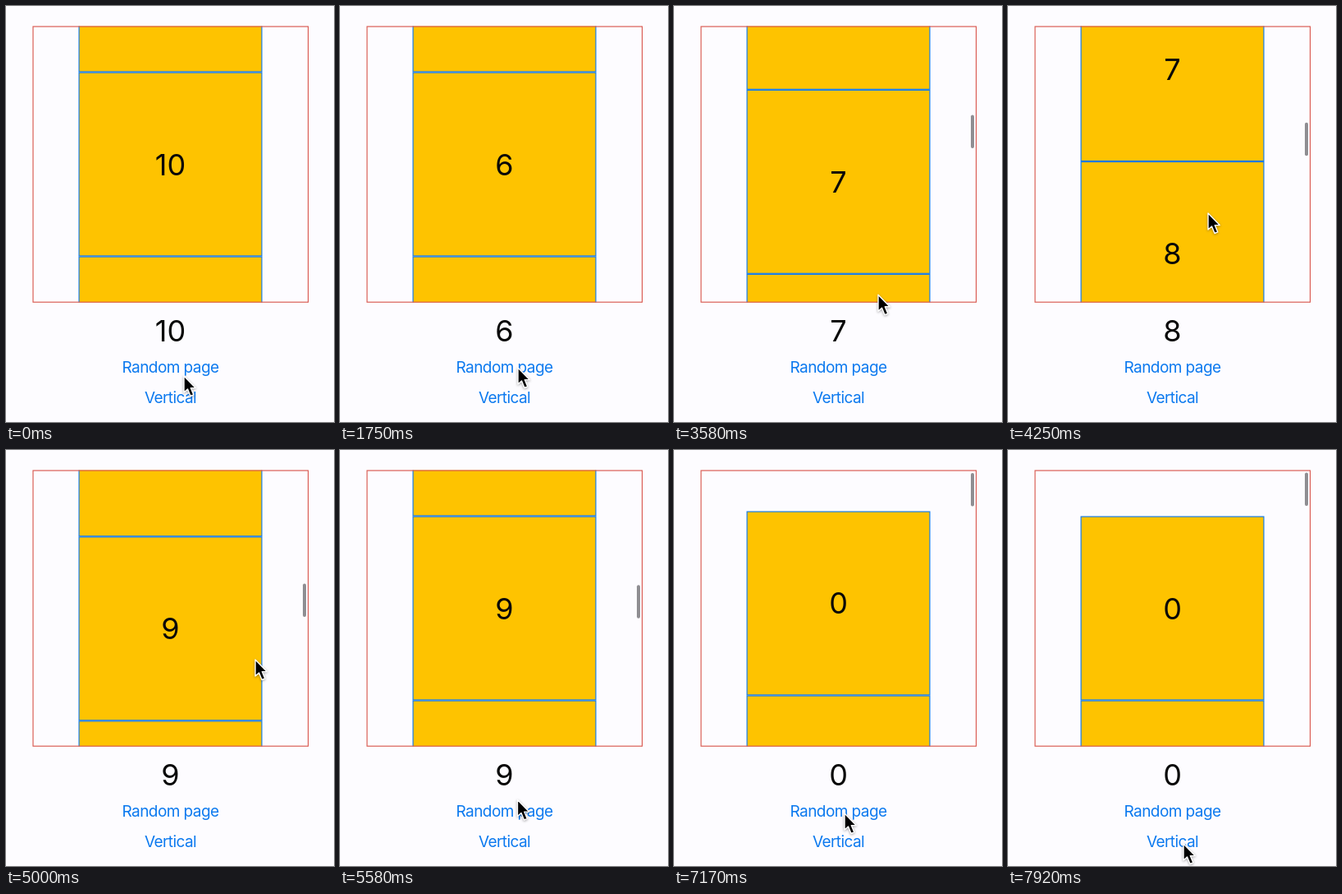
These frames come from a looping animation (400x506 px, 8 s). An HTML page:

```html
<!DOCTYPE html>
<html lang="en">
<head>
<meta charset="utf-8">
<title>Vertical pager</title>
<style>
  html, body { margin: 0; width: 100%; height: 100%; overflow: hidden; background: #fdfcff; }
  svg { display: block; width: 400px; height: 506px; }
  text { font-family: Inter, Roboto, sans-serif; text-anchor: middle; }
  .number { font-size: 36px; fill: #080808; }
  .link { font-size: 19px; letter-spacing: -.03em; fill: #0b79ef; }
  .page { fill: #fec300; stroke: #0d78ee; stroke-width: 1.15; }
  .frame { fill: none; stroke: #d9584f; stroke-width: 1.15; }
  #cursor { filter: drop-shadow(0 1.5px 1.5px rgb(0 0 0 / .35)); }
</style>
</head>
<body>
<svg viewBox="0 0 400 506">
  <clipPath id="view"><rect x="32.5" y="24.5" width="336" height="336"/></clipPath>
  <g clip-path="url(#view)">
    <g id="strip"></g>
    <rect id="bar" x="362" width="4" height="40.5" rx="2" fill="#8f8e92"/>
  </g>
  <rect class="frame" x="33" y="25" width="335.5" height="335.2"/>
  <text class="number" id="label" x="200.5" y="407.5"></text>
  <text class="link" x="200.5" y="446">Random page</text>
  <text class="link" x="200.5" y="483">Vertical</text>
  <path id="cursor" d="M0 0V20L4.5 16L8 24.5L11.8 22.9L8.3 14.6H14.2Z"
        fill="#000" stroke="#fff" stroke-width="1.4" stroke-linejoin="round"/>
</svg>
<script>
const LOOP = 8000, PAGE = 224, PAGES = 20;
const $ = id => document.getElementById(id);

const linear = p => p;
const easeOut = p => 1 - (1 - p) ** 3;
const easeInOut = p => p * p * (3 - 2 * p);

// Each key is [time, value, easing towards it].
const scroll = [
  [0, 10], [940, 10], [1600, 6, easeInOut],
  [3080, 6], [3330, 6.45, easeInOut], [3897, 7, easeOut],
  [3920, 7], [4250, 7.511, easeInOut], [4580, 8, easeOut],
  [4800, 8.42, linear], [5274, 9, easeOut],
  [5880, 9], [6450, 1, easeInOut],
  [6720, 1], [7220, 0, easeInOut]
];
const pointerX = [
  [0, 217], [2450, 217], [2830, 256, easeInOut], [3330, 252, linear],
  [3580, 249, easeInOut], [3900, 248], [4250, 244, easeInOut],
  [4560, 300, easeInOut], [4800, 304], [5050, 304],
  [5700, 208, easeInOut], [7250, 208], [7800, 214, easeInOut]
];
const pointerY = [
  [0, 450], [80, 450], [330, 440, easeInOut], [2450, 440],
  [2830, 325, easeInOut], [3080, 325], [3330, 224, easeInOut],
  [3580, 351, easeInOut], [3780, 366, easeOut], [3920, 366],
  [4250, 252, easeInOut], [4560, 349, easeInOut], [4580, 349],
  [4800, 255, linear], [5050, 255], [5700, 442, easeInOut],
  [7250, 442], [7800, 479, easeInOut]
];
const barOpacity = [[0, 0], [3080, 0], [3200, 1]];
const labels = [[0, 10], [940, 6], [3345, 7], [4245, 8], [4815, 9], [5880, 1], [6720, 0]];

function sample(keys, t) {
  const next = keys.findIndex(key => key[0] > t);
  if (next < 0) return keys.at(-1)[1];
  const [start, from] = keys[next - 1];
  const [end, to, ease = linear] = keys[next];
  return from + (to - from) * ease((t - start) / (end - start));
}

function make(tag, attributes, content = "") {
  const node = document.createElementNS("http://www.w3.org/2000/svg", tag);
  for (const name in attributes) node.setAttribute(name, attributes[name]);
  node.textContent = content;
  $("strip").append(node);
}

for (let i = 0; i < PAGES; i++) {
  const top = 80.5 + i * PAGE;
  make("rect", { class: "page", x: 89.05, y: top + .55, width: PAGE - 1.1, height: PAGE - 1.1 });
  make("text", { class: "number", x: 200.5, y: top + 125 }, i);
}

function draw(now) {
  const t = now % LOOP;
  const position = sample(scroll, t);
  $("strip").setAttribute("transform", `translate(0 ${-position * PAGE})`);
  $("bar").setAttribute("y", 27.5 + position * 15.2);
  $("bar").setAttribute("opacity", sample(barOpacity, t));
  $("cursor").setAttribute("transform", `translate(${sample(pointerX, t)} ${sample(pointerY, t)})`);
  $("label").textContent = labels.findLast(key => key[0] <= t)[1];
}

const begin = performance.now();
function tick() {
  draw(performance.now() - begin);
  requestAnimationFrame(tick);
}
tick();
</script>
</body>
</html>
```
